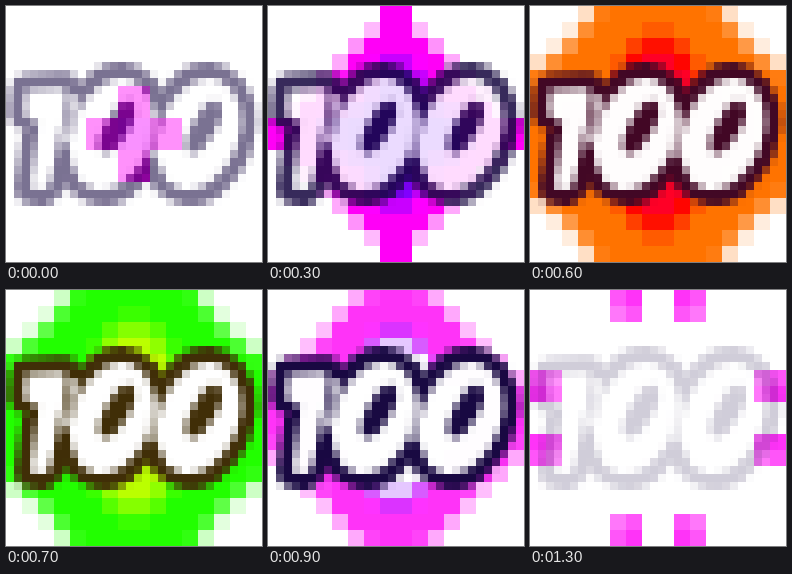
These frames come from a looping animation (256 px wide and 256 px high, 1400 ms). An HTML page with a canvas:

```html
<!DOCTYPE html>
<html lang="en">
<head>
<meta charset="utf-8">
<title>100</title>
<style>
  html, body { margin: 0; width: 100%; height: 100%; overflow: hidden; background: #fff; }
  canvas { display: block; width: 100vw; height: 100vh; image-rendering: pixelated; }
</style>
</head>
<body>
<canvas id="stage" width="32" height="32"></canvas>
<script>
const SIZE = 32, STEP = 100, COUNT = 14;
const WHITE = [255, 255, 255];
const ctx = document.getElementById('stage').getContext('2d');
const image = ctx.createImageData(SIZE, SIZE);

const clamp = v => Math.max(0, Math.min(1, v));
const mix = (a, b, k) => a.map((v, i) => v + (b[i] - v) * k);

function hsl(h, s, l) {
  const a = s * Math.min(l, 1 - l);
  return [0, 8, 4].map(n => {
    const k = (n + h / 30) % 12;
    return 255 * (l - a * Math.max(-1, Math.min(k - 3, 9 - k, 1)));
  });
}

// The burst grows for four steps, swells through other hues, then opens into a ring.
function poseAt(step) {
  const grow = Math.min(step / 4, 1);
  const swell = Math.sin(Math.PI * clamp((step - 4) / 5));
  return {
    opacity: step < 7 ? 1 - .43 * (1 - step / 7) ** 2 : 1 - .8 * ((step - 7) / 6) ** 4,
    arm: step < 4 ? 3 + 2.5 * step : 0,
    disc: step ? 7.6 * grow ** .8 + 1.4 * swell : 0,
    hole: step > 8 ? 4.3 + .95 * (step - 9) : 0,
    core: 4.9 * grow - .5 * Math.max(0, step - 8),
    strength: step > 8 ? .8 : 1,
    hue: step > 5 && step < 9 ? (step - 5) * 85 : 0,
    sparks: clamp((step - 11) / 2)
  };
}

// The badge as a mask: alpha is coverage, brightness separates ink from fill.
function makeBadge() {
  const canvas = document.createElement('canvas');
  canvas.width = canvas.height = SIZE;
  const c = canvas.getContext('2d');
  c.scale(1 / 8, 1 / 8);
  c.lineJoin = c.lineCap = 'round';
  c.filter = 'blur(.35px)';

  const one = new Path2D('M20 84 L58 82 L61 92 L44 178 L38 184 L24 182 L33 118 L18 108 Z');
  const oval = (x, y, rx, ry, tilt) => {
    const p = new Path2D();
    p.ellipse(x, y, rx, ry, tilt, 0, Math.PI * 2);
    return p;
  };
  const zeros = [106, 193];
  const parts = [one, ...zeros.map(x => oval(x, 128, 40, 58, .36))];

  c.lineWidth = 31;
  parts.forEach(p => c.stroke(p));
  c.fillStyle = '#fff';
  parts.forEach(p => c.fill(p));
  c.fillStyle = '#000';
  zeros.forEach(x => c.fill(oval(x + 5, 121, 12, 29, .5)));

  c.lineWidth = 8;
  c.strokeStyle = '#c8c8c8';
  c.stroke(new Path2D('M69 92 L60 136 M149 110 L145 150'));
  return c.getImageData(0, 0, SIZE, SIZE).data;
}

const badge = makeBadge();

// Alpha and core weight of one coarse cell, given its distances from the centre.
function glowAt(dx, dy, pose) {
  const { arm, disc, hole, core } = pose;
  const hi = Math.max(dx, dy), lo = Math.min(dx, dy);
  const d = Math.hypot(dx, dy);
  const wave = Math.cos(4 * Math.atan2(dy, dx));

  let a = disc && clamp(.5 + (disc * (1 + .1 * wave) - d) / 1.15);
  if (hole) a *= clamp(.5 + d - hole - .5 * wave);
  if (lo < 1 && hi < arm) a = 1;
  if (hi > 6 && lo > 1 && lo < 3) a = Math.max(a, pose.sparks * (hi - lo) / 6);
  return [a * pose.strength, clamp(.5 + (core + wave * core / 5 - d) / 2)];
}

function draw(step) {
  const pose = poseAt(step);
  const ink = hsl((256 + pose.hue * .85) % 360, .8, .14);

  for (let row = 0; row < 16; row++) {
    for (let col = 0; col < 16; col++) {
      const [a, core] = glowAt(Math.abs(col - 7.5), Math.abs(row - 7.5), pose);
      const glow = hsl((302 - 36 * core + pose.hue) % 360, 1, .5);
      const back = mix(WHITE, glow, a);

      for (let n = 0; n < 4; n++) {
        const i = 4 * ((row * 2 + (n >> 1)) * SIZE + col * 2 + (n & 1));
        const face = mix(ink, WHITE, badge[i] / 255);
        const rgb = mix(back, face, badge[i + 3] / 255 * pose.opacity);
        image.data.set([...rgb, 255], i);
      }
    }
  }
  ctx.putImageData(image, 0, 0);
}

let start, shown = 0;
function tick(now) {
  start ??= now;
  const step = Math.floor((now - start) / STEP) % COUNT;
  if (step !== shown) draw(shown = step);
  requestAnimationFrame(tick);
}
draw(0);
requestAnimationFrame(tick);
</script>
</body>
</html>
```
